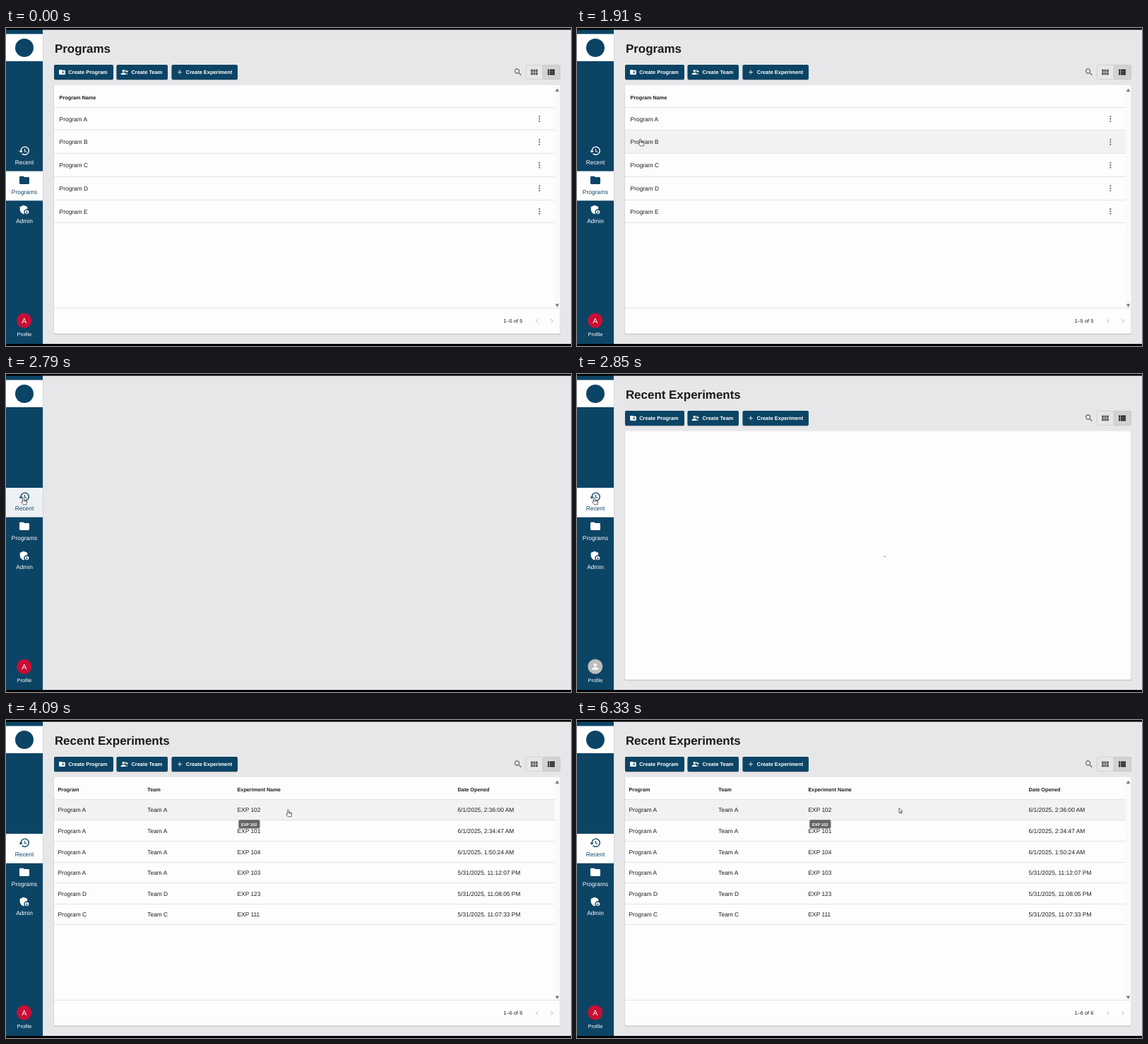
An HTML page that plays this animation: 800 px wide and 450 px high, repeating every 6360 ms.

```html
<!DOCTYPE html>
<html lang="en">
<head>
<meta charset="utf-8">
<title>Experiment manager</title>
<style>
  html, body { margin: 0; width: 100%; height: 100%; overflow: hidden; background: #000; }
  svg { display: block; width: 800px; height: 450px; }
  text { font-family: "Liberation Sans", Arial, sans-serif; text-rendering: geometricPrecision; white-space: pre; }
</style>
</head>
<body>
<svg id="stage" viewBox="0 0 800 450" xmlns="http://www.w3.org/2000/svg"></svg>
<script>
const LOOP = 6360, CLICK = 2760, SHELL = 2850, LOADED = 3090;
const NAVY = '#0c4465', INK = '#1b1b1d', LINE = '#e3e3e5';

const ICONS = {
  history: 'M13 3a9 9 0 0 0-9 9H1l3.89 3.89.07.14L9 12H6a7 7 0 1 1 2.06 4.94l-1.42 1.42A9 9 0 1 0 13 3zm-1 5v5l4.28 2.54.72-1.21-3.5-2.08V8z',
  folder: 'M10 4H4c-1.1 0-2 .9-2 2v12c0 1.1.9 2 2 2h16c1.1 0 2-.9 2-2V8c0-1.1-.9-2-2-2h-8z',
  shield: 'M17 11c.34 0 .67.04 1 .09V6.27L10.5 3 3 6.27v4.91c0 4.54 3.2 8.79 7.5 9.82.55-.13 1.08-.32 1.6-.55A6 6 0 0 1 17 11zm0 2a4 4 0 1 0 0 8 4 4 0 0 0 0-8zm0 1.4a1.1 1.1 0 1 1 0 2.2 1.1 1.1 0 0 1 0-2.2zm0 5.3c-.9 0-1.7-.4-2.2-1.1 0-1.5 4.4-1.5 4.4 0-.5.7-1.3 1.1-2.2 1.1z',
  search: 'M15.5 14h-.8l-.3-.3A6.5 6.5 0 1 0 13.7 14.4l.3.3v.8l5 5 1.5-1.5zm-6 0a4.5 4.5 0 1 1 0-9 4.5 4.5 0 0 1 0 9z',
  person: 'M12 12a4 4 0 1 0 0-8 4 4 0 0 0 0 8zm0 2c-2.67 0-8 1.34-8 4v2h16v-2c0-2.66-5.33-4-8-4z',
  team: 'M8 12a4 4 0 1 0 0-8 4 4 0 0 0 0 8zm0 2c-2.7 0-8 1.3-8 4v2h16v-2c0-2.7-5.3-4-8-4zm4.5-10a4 4 0 0 1 0 8 6 6 0 0 0 0-8zm4 10.8c1.400.8 2 1.900 2 3.200v2h2v-2c0-1.500-1.800-2.600-4-3.200zM20 9V6h-2v3h-3v2h3v3h2v-3h3V9z',
  newFolder: 'M20 6h-8l-2-2H4c-1.1 0-2 .9-2 2v12c0 1.1.9 2 2 2h16c1.1 0 2-.9 2-2V8c0-1.1-.9-2-2-2zm-1 8h-3v3h-2v-3h-3v-2h3V9h2v3h3z',
  plus: 'M19 13h-6v6h-2v-6H5v-2h6V5h2v6h6z'
};

const rect = (x, y, w, h, fill, more = '') =>
  `<rect x="${x}" y="${y}" width="${w}" height="${h}" fill="${fill}" ${more}/>`;
const text = (x, y, size, s, fill = INK, more = '') =>
  `<text x="${x}" y="${y}" font-size="${size}" fill="${fill}" ${more}>${s}</text>`;
const bold = (x, y, size, s, fill = INK) => text(x, y, size, s, fill, 'font-weight="700"');
const mid = (x, y, size, s, fill) => text(x, y, size, s, fill, 'text-anchor="middle"');
const icon = (name, cx, cy, scale, fill) =>
  `<path d="${ICONS[name]}" fill="${fill}" fill-rule="evenodd" transform="translate(${cx - 12 * scale} ${cy - 12 * scale}) scale(${scale})"/>`;
const rule = (y, right = 777) => rect(68, y - .5, right - 68, 1, LINE);
const stroke = (d, color, width) => `<path d="${d}" fill="none" stroke="${color}" stroke-width="${width}"/>`;

const programs = {
  title: 'Programs', top: 112.5, pitch: 32.75, count: '1–5 of 5', menu: true,
  columns: [[75.6, 'Program Name']],
  rows: [...'ABCDE'].map(c => ['Program ' + c])
};
const recent = {
  title: 'Recent Experiments', top: 112.9, pitch: 29.55, count: '1–6 of 6',
  columns: [[73.5, 'Program'], [200.3, 'Team'], [327.5, 'Experiment Name'], [639.6, 'Date Opened']],
  rows: [
    ['A', 102, '6/1/2025, 2:36:00 AM'], ['A', 101, '6/1/2025, 2:34:47 AM'],
    ['A', 104, '6/1/2025, 1:50:24 AM'], ['A', 103, '5/31/2025, 11:12:07 PM'],
    ['D', 123, '5/31/2025, 11:08:05 PM'], ['C', 111, '5/31/2025, 11:07:33 PM']
  ].map(([c, n, date]) => ['Program ' + c, 'Team ' + c, 'EXP ' + n, date])
};

function button(x, w, name, label, textX) {
  return rect(x, 53, w, 21, '#000', 'rx="2" opacity=".22"') + rect(x, 52, w, 21, NAVY, 'rx="2"') +
    icon(name, x + 11.5, 62.4, .44, '#fff') + bold(textX, 64.7, 7.4, label, '#fff');
}

function toolbar() {
  let s = button(68, 84, 'newFolder', 'Create Program', 88.2) +
    button(156.5, 72.5, 'team', 'Create Team', 177.5) +
    button(234.5, 93.5, 'plus', 'Create Experiment', 254.8) +
    icon('search', 725, 62.4, .56, '#5b5b5d') +
    rect(736, 52.5, 48.5, 20, '#e7e7e9', 'rx="2" stroke="#cfcfd1" stroke-width=".8"') +
    rect(760, 52.5, 24.5, 20, '#d2d2d4', 'rx="2" stroke="#c6c6c8" stroke-width=".8"');
  for (let i = 0; i < 6; i++) s += rect(743 + i % 3 * 3.5, 58.6 + (i > 2) * 4.2, 2.9, 3.6, '#626264');
  for (let i = 0; i < 3; i++) {
    const y = 58.6 + i * 2.8;
    s += rect(767, y, 2.1, 2.2, INK) + rect(769.8, y, 7.2, 2.2, INK);
  }
  return s;
}

function frame(view) {
  return bold(68.9, 35.1, 16.95, view.title) + toolbar() +
    rect(67.5, 80.5, 717.5, 353.5, '#000', 'rx="3" opacity=".13"') +
    rect(68, 80.5, 716.5, 352, '#fdfcfe', 'rx="2"');
}

function table(view, hovered) {
  let s = rect(777, 81, 7.5, 315.5, '#fafafb') +
    '<path d="M777.8 90h5.400l-2.700-4.400zM777.8 390.500h5.400l-2.700 4.400z" fill="#77777a"/>';
  if (hovered >= 0) s += rect(68, view.top + hovered * view.pitch, 709, view.pitch, '#f2f2f3');
  s += rule(112.5) + rule(396.5, 784.5);
  view.columns.forEach(([x, label]) => s += bold(x, 100.5, 7.27, label));
  view.rows.forEach((cells, i) => {
    const cy = view.top + (i + .5) * view.pitch;
    s += rule(Math.round(view.top + (i + 1) * view.pitch) - .5);
    cells.forEach((cell, k) => s += text(view.columns[k][0], cy + 2.8, 8.4, cell));
    if (view.menu) for (const d of [-3.4, 0, 3.4])
      s += `<circle cx="755.3" cy="${cy - .3 + d}" r="1.05" fill="#5c5c5e"/>`;
  });
  return s + text(704.6, 417, 7.4, view.count) +
    stroke('M753.500 412l-2.700 2.700 2.700 2.700M771.500 412l2.700 2.700-2.700 2.700', '#b2b2b5', 1);
}

function navItem(y, name, label, selected, back) {
  const color = selected ? NAVY : '#fff';
  return (back ? rect(0, y, 52, 41.7, back) : '') +
    icon(name, 26, y + 12.7, .7, color) + mid(26, y + 32, 8.4, label, color);
}

function sidebar(t, overRecent) {
  const onRecent = t >= CLICK;
  const recentBack = onRecent ? (t < SHELL ? '#edf1f4' : '#fff') : overRecent ? '#0d3953' : '';
  const guest = t >= SHELL && t < LOADED;
  return rect(52, 2.5, 1, 444.5, '#d5d7da') + rect(0, 2.5, 52, 444.5, NAVY) + rect(0, 8.5, 52, 38.5, '#fff') +
    `<circle cx="26" cy="28" r="13" fill="${NAVY}"/>` +
    navItem(161, 'history', 'Recent', onRecent, recentBack) +
    navItem(202.6, 'folder', 'Programs', !onRecent, onRecent ? '' : '#fff') +
    navItem(244.3, 'shield', 'Admin', false, '') +
    `<circle cx="25.8" cy="414" r="10.5" fill="${guest ? '#bdbdbd' : '#c80f35'}"/>` +
    (guest ? icon('person', 25.8, 414, .56, '#fff') : mid(25.8, 417.7, 10.5, 'A', '#fff')) +
    mid(26, 435.7, 7.4, 'Profile', '#fff');
}

function spinner(age) {
  const start = age / 1400 * Math.PI * 2;
  const end = start + .1 + 4 * Math.min(1, age / 700) ** 2;
  const at = a => `${426 + 10 * Math.cos(a)} ${257.6 + 10 * Math.sin(a)}`;
  return stroke(`M${at(start)}A10 10 0 ${+(end - start > Math.PI)} 1 ${at(end)}`, NAVY, 1.8);
}

// time, x, y of the pointer's hot spot
const PATH = [
  [700, 449, 2], [1210, 234.5, 117], [1420, 234.5, 117], [2200, 24.5, 174.5],
  [3300, 24.5, 174.5], [3900, 399.5, 126.5], [5250, 399.5, 126.5], [6000, 456, 124.5], [LOOP, 456, 124.5]
];

function pointerAt(t) {
  const i = PATH.findIndex(p => t < p[0]);
  if (i < 1) return null;
  const [t0, x0, y0] = PATH[i - 1], [t1, x1, y1] = PATH[i];
  const u = (t - t0) / (t1 - t0), e = u * u * (3 - 2 * u);
  return { x: x0 + (x1 - x0) * e, y: y0 + (y1 - y0) * e };
}

function rowUnder(p, view) {
  if (!p || p.x < 68 || p.x > 777) return -1;
  const i = Math.floor((p.y - view.top) / view.pitch);
  return i >= 0 && i < view.rows.length ? i : -1;
}

function pointer(p, hand) {
  const d = hand
    ? 'M-1 1Q0-.7 1 1V4l3 .7q1.500.5 1.300 2L4.500 10.300H-.3L-2.700 6.800q.1-1.500 1.700-.3zM1 4v2M2.600 4.500v1.700M4 4.800v1.500'
    : 'M0 0V7l1.600-1.400L2.700 8l1.200-.5L2.800 5.100H5z';
  return `<path d="${d}" transform="translate(${p.x} ${p.y})" fill="#fff" stroke="#333" stroke-width=".75" stroke-linejoin="round"/>`;
}

function tooltip(opacity) {
  return `<g opacity="${opacity}">` + rect(329.3, 141.3, 30.2, 12.3, '#666668', 'rx="2"') +
    bold(333, 149.5, 5.7, 'EXP 102', '#fff') + '</g>';
}

function scene(t) {
  const p = pointerAt(t), view = t < CLICK ? programs : recent;
  const ready = t < CLICK || t >= LOADED;
  const row = ready ? rowUnder(p, view) : -1;
  const overNav = p && p.x < 52 && p.y > 161 && p.y < 286;
  const overButton = p && p.x > 68 && p.x < 328 && p.y > 52 && p.y < 73;
  let s = rect(0, 0, 800, 450, '#000') + rect(52, 2.5, 748, 444.5, '#e7e7e9');
  if (t < CLICK || t >= SHELL) s += frame(view);
  if (ready) s += table(view, row);
  else if (t >= SHELL) s += spinner(t - SHELL);
  s += sidebar(t, overNav);
  if (t > 3880) s += tooltip(Math.min(1, (t - 3880) / 150));
  if (p) s += pointer(p, t < 6150 && (row >= 0 || overNav || overButton));
  return s;
}

const stage = document.getElementById('stage');
const began = performance.now();
function tick() {
  stage.innerHTML = scene((performance.now() - began) % LOOP);
  requestAnimationFrame(tick);
}
tick();
</script>
</body>
</html>
```
